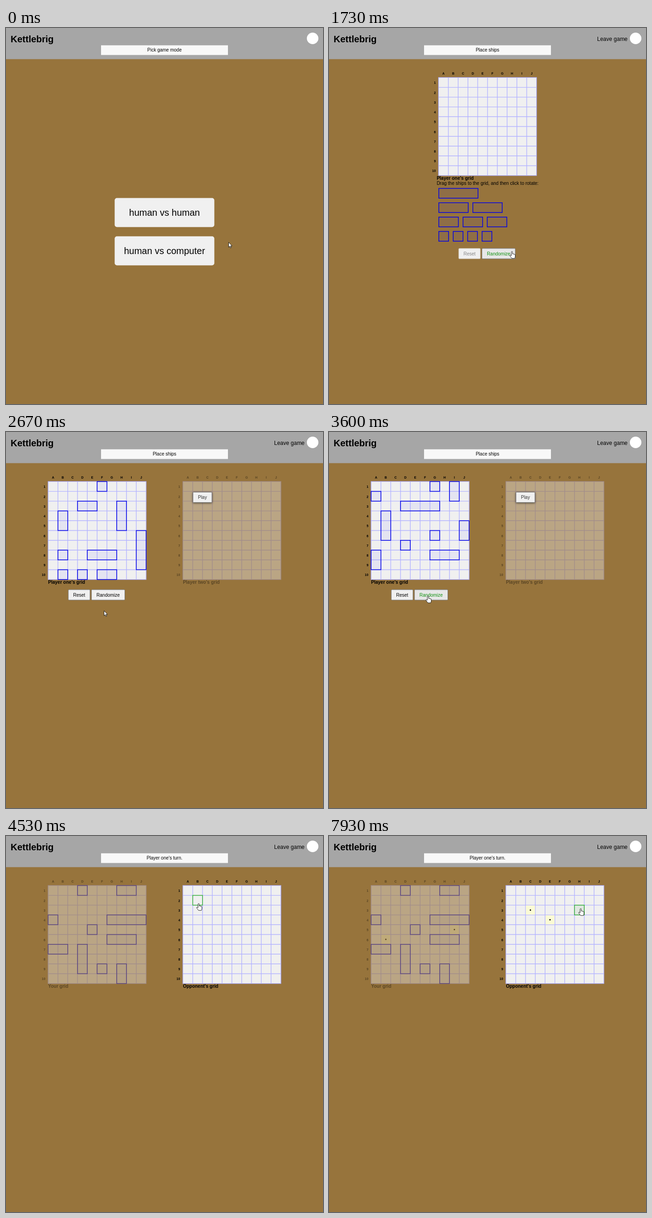
These frames come from a looping animation (687 px wide and 815 px high, 8 s). An HTML page:

```html
<!DOCTYPE html>
<html lang="en">
<head>
<meta charset="utf-8">
<title>Kettlebrig</title>
<style>
  html, body { margin: 0; width: 100%; height: 100%; overflow: hidden; background: #97743c; }
  svg { display: block; font: 10px "Liberation Sans", Arial, sans-serif; }
  .mid { text-anchor: middle; }
  .bold { font-weight: bold; }
  .label { font-size: 7px; font-weight: bold; }
  .board { fill: #f0f0f0; stroke: #b4b4ff; stroke-width: 1.4; }
  .ship { fill: rgba(0, 0, 255, .05); stroke: #0000e6; stroke-width: 1.5; }
  .miss { fill: #fbfbd4; }
  .dim { opacity: .4; }
  .btn rect { fill: #f0f0f0; stroke: #767676; }
  .btn.menu rect { stroke: none; }
  .btn.menu text { font-size: 20px; }
  .btn.play rect { stroke: #777; filter: drop-shadow(0 1px 2px rgba(0, 0, 0, .6)); }
  .btn.play text { fill: #333; }
  .btn.off rect { stroke: #c4b8a4; }
  .btn.off text { fill: #858585; }
  .btn.hot rect { fill: #e7e7e7; }
  .btn.hot text { fill: #109010; }
  #hover { fill: rgba(0, 128, 0, .07); stroke: #3cb43c; stroke-width: 1.5; }
  #hover.fresh { fill: none; }
  #cursor path { fill: #fff; stroke: #111; stroke-width: .9; stroke-linejoin: round; }
</style>
</head>
<body>
<svg id="stage" width="687" height="815" viewBox="0 0 687 815">
  <rect width="687" height="815" fill="#97743c"/>
  <rect width="687" height="67.5" fill="#a6a6a6"/>
  <text class="bold" x="10" y="30.5" font-size="20">Kettlebrig</text>
  <circle cx="664.5" cy="22.5" r="12.5" fill="#fff"/>
  <rect x="206" y="37.5" width="275" height="21" fill="#f8f8f8"/>
  <text id="status" class="mid" x="343.5" y="51.3"></text>
  <text id="leave" x="581" y="27.5" font-size="12">Leave game</text>
  <g id="menu"></g>
  <g id="place"></g>
  <g id="setup"></g>
  <g id="battle"></g>
  <rect id="hover"/>
  <g id="cursor">
    <path id="arrow" d="M0 0V10.6L2.5 8.4 4.1 12.2 5.8 11.5 4.2 7.8H7.4Z"/>
    <path id="hand" d="M-1.3 9V1.2a1.3 1.3 0 0 1 2.6 0V5.2q1.3-.8 2.2 .5q1.3-.6 2 .6q1.6-.4 1.6 1.2V10.5q0 2-1.2 4.3H-.2Q-2.5 12-4.3 9.3Q-4.7 7.6-3 7.7Z"/>
  </g>
</svg>
<script>
const LOOP = 8000, TICK = 1000 / 15;     // the screen refreshes 15 times a second
const CELL = 21.23, TOP = 107.4, LEFT_X = 91.3, MID_X = 237.4, RIGHT_X = 383.4;
const COLS = 'ABCDEFGHIJ';

// Ticks at which the state changes
const PLACE = 11, SETUP = 28, SHUFFLES = [SETUP, 50, 57], BATTLE = 67, SHOTS = [82, 106];

const FLEETS = [
  'F1 D3E3 H3H5 B4B5 J6J9 B8 E8G8 B10 D10 F10G10',
  'G1 I1I2 A2 D3G3 B4B6 J5J6 G6 D7 G8I8 A8A9',
  'D1 H1I1 A4 G4J4 E5 G6I6 A7B7 D7D9 F9 H9H10'
];
const FIRED = ['E4', 'C3'], TAKEN = ['B6', 'I5'];

// Pointer path: tick, x, y
const PATH = [
  [2, 482, 464], [3, 477, 466], [7, 428, 481], [9, 421, 478], [15, 421, 478], [17, 425, 478],
  [19, 425, 478], [20, 426, 477], [22, 426, 477], [26, 396, 484], [32, 396, 484], [36, 300, 430],
  [40, 212, 387], [42, 187, 380], [45, 206, 370], [47, 213, 356], [54, 214, 355], [58, 217, 350],
  [62, 320, 250], [65, 415, 147], [68, 417, 146], [72, 417, 146], [76, 488, 182], [78, 482, 186],
  [96, 482, 186], [97, 480, 180], [98, 473, 180], [100, 473, 180], [101, 462, 183], [104, 437, 160],
  [107, 437, 160], [108, 448, 160], [110, 448, 160], [113, 599, 156], [115, 599, 156],
  [116, 600, 156], [117, 600, 156], [118, 566, 157], [119, 545, 157]
];

const $ = id => document.getElementById(id);
const show = (el, on) => { el.style.display = on ? '' : 'none'; };

function add(parent, tag, attrs = {}, text = '') {
  const el = document.createElementNS('http://www.w3.org/2000/svg', tag);
  for (const k in attrs) el.setAttribute(k, attrs[k]);
  el.textContent = text;
  return parent.appendChild(el);
}

function cells(code) {
  return [...code.matchAll(/([A-J])(\d+)/g)].map(m => [COLS.indexOf(m[1]), m[2] - 1]);
}

function grid(parent, x, caption, dim, captionX = x) {
  const g = add(parent, 'g', dim ? { class: 'dim' } : {});
  const size = CELL * 10;
  let lines = '';
  add(g, 'rect', { class: 'board', x, y: TOP, width: size, height: size });
  for (let i = 0; i < 10; i++) {
    const d = i * CELL;
    if (i) lines += `M${x + d} ${TOP}v${size}M${x} ${TOP + d}h${size}`;
    add(g, 'text', { class: 'label mid', x: x + d + CELL / 2, y: 101 }, COLS[i]);
    add(g, 'text', { class: 'label', 'text-anchor': 'end', x: x - 6, y: TOP + d + 14 }, i + 1);
  }
  add(g, 'path', { class: 'board', d: lines });
  add(g, 'text', { class: 'bold', x: captionX, y: 328.5 }, caption);
  return g;
}

function ship(parent, x, y, w, h = 1) {
  add(parent, 'rect', { class: 'ship', x, y, width: w * CELL, height: h * CELL });
}

function fleet(parent, codes) {
  const g = add(parent, 'g');
  for (const code of codes.split(' ')) {
    const [a, b = a] = cells(code);
    ship(g, LEFT_X + a[0] * CELL, TOP + a[1] * CELL, b[0] - a[0] + 1, b[1] - a[1] + 1);
  }
  return g;
}

function miss(parent, x, code) {
  const g = add(parent, 'g'), [[c, r]] = cells(code);
  const px = x + c * CELL, py = TOP + r * CELL;
  add(g, 'rect', { class: 'miss', x: px + .7, y: py + .7, width: CELL - 1.4, height: CELL - 1.4 });
  add(g, 'circle', { cx: px + CELL / 2, cy: py + CELL / 2 - .1, r: 1.5 });
  return g;
}

const buttons = [];
function button(scene, text, x, y, w, h, kind = '') {
  const el = add($(scene), 'g', { class: 'btn ' + kind });
  const big = kind === 'menu';
  add(el, 'rect', { x, y, width: w, height: h, rx: big ? 5 : 1.5 });
  add(el, 'text', { class: 'mid', x: x + w / 2, y: y + h / 2 + (big ? 6.7 : 3.5) }, text);
  if (kind !== 'off') buttons.push({ el, scene, x, y, w, h });
}

button('menu', 'human vs human', 235.5, 368.5, 216, 63, 'menu');
button('menu', 'human vs computer', 235.5, 451.5, 216, 63, 'menu');

grid($('place'), MID_X, "Player one's grid", false, 233.4);
add($('place'), 'text', { x: 233.4, y: 340 }, 'Drag the ships to the grid, and then click to rotate:');
for (let row = 0; row < 4; row++) {
  const len = 4 - row;
  for (let i = 0; i <= row; i++) ship($('place'), 238 + i * (len * CELL + 10), 347.6 + row * 31.1, len);
}
button('place', 'Reset', 281, 477.8, 47, 22.4, 'off');
button('place', 'Randomize', 331.5, 477.8, 72.3, 22.4);

const mine = grid($('setup'), LEFT_X, "Player one's grid");
const layouts = FLEETS.map(f => fleet(mine, f));
grid($('setup'), RIGHT_X, "Player two's grid", true);
button('setup', 'Reset', 135, 341.8, 47, 22.4);
button('setup', 'Randomize', 185.2, 341.8, 72.3, 22.4);
button('setup', 'Play', 405.2, 130.4, 41, 22.4, 'play');

const own = grid($('battle'), LEFT_X, 'Your grid', true);
const foe = grid($('battle'), RIGHT_X, "Opponent's grid");
fleet(own, FLEETS[2]);
const marks = SHOTS.map((at, i) => [miss(foe, RIGHT_X, FIRED[i]), miss(own, LEFT_X, TAKEN[i])]);

for (const [k, v] of Object.entries({ width: CELL, height: CELL })) $('hover').setAttribute(k, v);

function pointer(n) {
  const i = PATH.findIndex(p => p[0] >= n);
  if (i < 0) return PATH[PATH.length - 1].slice(1);
  if (i === 0) return PATH[0].slice(1);
  const [t0, x0, y0] = PATH[i - 1], [t1, x1, y1] = PATH[i];
  const k = (n - t0) / (t1 - t0);
  return [x0 + (x1 - x0) * k, y0 + (y1 - y0) * k];
}

function render(ms) {
  const n = Math.floor((ms + 5) / TICK);
  const scene = n < PLACE ? 'menu' : n < SETUP ? 'place' : n < BATTLE ? 'setup' : 'battle';
  for (const id of ['menu', 'place', 'setup', 'battle']) show($(id), id === scene);
  show($('leave'), scene !== 'menu');
  $('status').textContent = scene === 'menu' ? 'Pick game mode'
    : scene === 'battle' ? "Player one's turn." : 'Place ships';

  const current = SHUFFLES.filter(t => t <= n).length - 1;
  layouts.forEach((g, i) => show(g, i === current));
  marks.forEach((pair, i) => pair.forEach(g => show(g, n >= SHOTS[i])));

  const [x, y] = pointer(n);
  let hand = false;
  for (const b of buttons) {
    const hot = b.scene === scene && x >= b.x && x <= b.x + b.w && y >= b.y && y <= b.y + b.h;
    b.el.classList.toggle('hot', hot);
    hand = hand || hot;
  }

  const col = Math.floor((x - RIGHT_X) / CELL), row = Math.floor((y - TOP) / CELL);
  const used = FIRED.some((c, i) => n >= SHOTS[i] && c === COLS[col] + (row + 1));
  const aim = scene === 'battle' && col >= 0 && col < 10 && row >= 0 && row < 10 && !used;
  show($('hover'), aim);
  if (aim) {
    $('hover').setAttribute('x', RIGHT_X + col * CELL);
    $('hover').setAttribute('y', TOP + row * CELL);
    $('hover').classList.toggle('fresh', n < BATTLE + 2);
    hand = true;
  }
  show($('hand'), hand);
  show($('arrow'), !hand);
  $('cursor').setAttribute('transform', `translate(${Math.round(x) + .5} ${Math.round(y) + .5})`);
}

const start = performance.now();
function loop() {
  render((performance.now() - start) % LOOP);
  requestAnimationFrame(loop);
}
loop();
</script>
</body>
</html>
```
